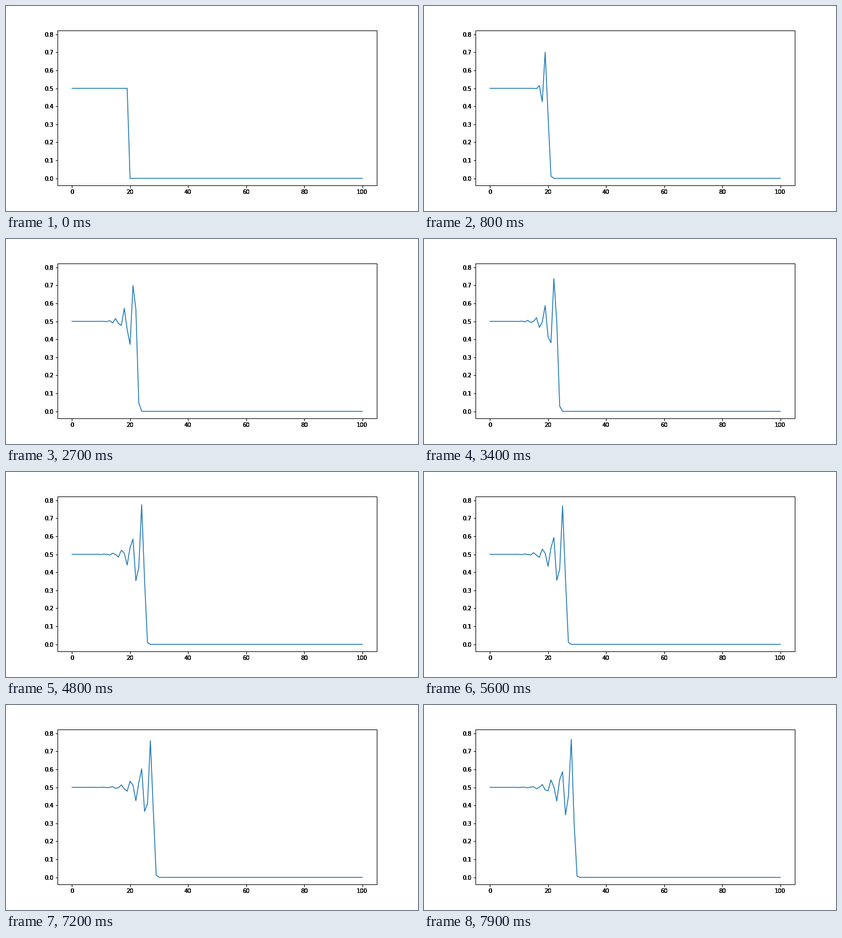
Recreate the animation shown at these times as a matplotlib script. Size 720 by 360 pixels, loop 8000 ms.

```python
import numpy as np
import matplotlib.pyplot as plt
from matplotlib.animation import FuncAnimation

CELLS = 101
FRAMES = 80
RATIO = 0.5        # dt / dx
FRAME_PASSES = 5   # repeated axes passes give the heavy, hard-edged labels

plt.rcParams.update({"font.family": "DejaVu Sans", "font.size": 10})


def flux(u):
    return u**2 / 2


def step(u):
    """One two-step Lax-Wendroff update of Burgers' equation."""
    left, right = u[:-1], u[1:]
    mid = (left + right) / 2 - RATIO / 2 * (flux(right) - flux(left))
    new = u.copy()
    new[1:-1] -= RATIO * np.diff(flux(mid))
    return new


x = np.arange(CELLS)
states = [np.where(x < 20, 0.5, 0.0)]
for _ in range(FRAMES - 1):
    states.append(step(states[-1]))
peak = np.max(states)

fig = plt.figure(figsize=(10, 5), dpi=72, facecolor="white")
box = [0.125, 0.125, 0.775, 0.755]


def add_axes():
    ax = fig.add_axes(box)
    ax.set_xlim(-5, 105)
    ax.set_ylim(-0.05 * peak, 1.05 * peak)
    ax.patch.set_visible(False)
    return ax


axes = [add_axes() for _ in range(FRAME_PASSES)]
line, = axes[0].plot(x, states[0], color="#1f77b4", lw=1.5,
                     scalex=False, scaley=False)


def update(i):
    line.set_ydata(states[i])
    return line,


anim = FuncAnimation(fig, update, frames=FRAMES, interval=100,
                     repeat=True, repeat_delay=0)
plt.show()
```
